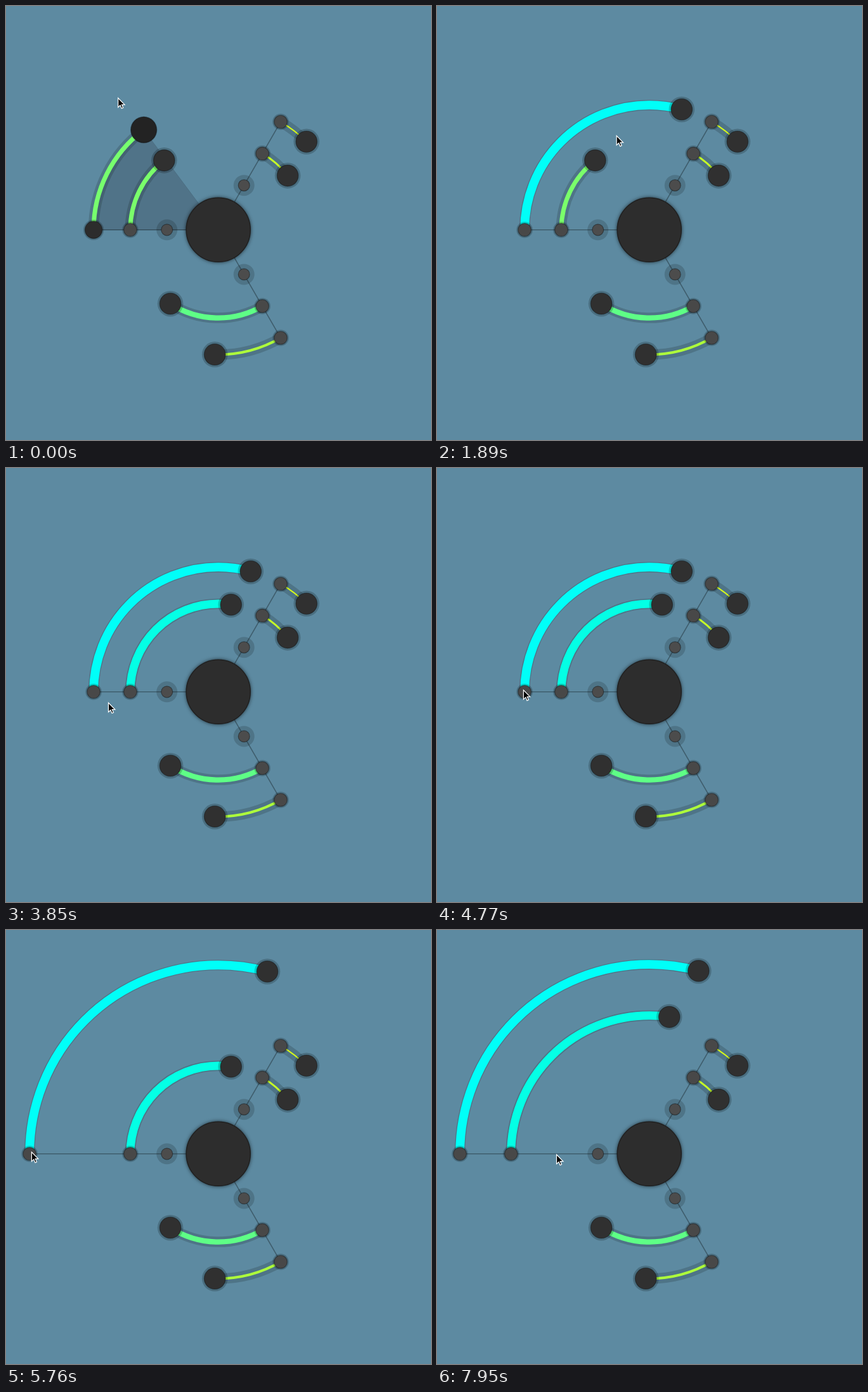
These frames come from a looping animation (670x684 px, 8000 ms). An HTML page with a canvas:

```html
<!DOCTYPE html>
<html lang="en">
<head>
<meta charset="utf-8">
<title>Radial sliders</title>
<style>
html, body { margin: 0; width: 100%; height: 100%; overflow: hidden; background: #5d8aa1; }
canvas { display: block; width: 670px; height: 684px; }
</style>
</head>
<body>
<canvas id="stage"></canvas>
<script>
const W = 670, H = 684, LOOP = 8000;
const CX = 334.7, CY = 352.8, RAD = Math.PI / 180;
const STUB = 81, INNER = 138.8, OUTER = 196.6;
const canvas = document.getElementById('stage');
const ratio = window.devicePixelRatio || 1;
canvas.width = W * ratio;
canvas.height = H * ratio;
const ctx = canvas.getContext('2d');

const sine = u => (1 - Math.cos(Math.PI * u)) / 2;
const cubic = u => u < 0.5 ? 4 * u ** 3 : 1 - 4 * (1 - u) ** 3;
const mix = (a, b, f) => a + (b - a) * f;
const progress = (t, start, end) => Math.min(1, Math.max(0, (t - start) / (end - start)));
const tween = (t, start, end, a, b, ease = sine) => mix(a, b, ease(progress(t, start, end)));

// Turning points of the pointer: time, x, y
const path = [
  [0, 176, 145], [450, 265, 126], [1050, 447, 142], [1350, 486, 150],
  [1830, 289, 199], [2240, 246, 236], [2450, 246, 236], [2890, 301, 241],
  [3420, 351, 241], [3770, 115, 366], [3850, 161, 370], [4480, 140, 350],
  [4770, 136, 350], [5220, 75, 351], [5520, 37, 350], [5750, 37, 350],
  [6370, 200, 355], [6880, 187, 351], [7030, 161, 348], [7630, 117, 351],
  [7720, 119, 352], [7950, 188, 354]
];

function pointerAt(t) {
  const next = path.findIndex(p => p[0] > t);
  if (next < 0) return path[path.length - 1].slice(1);
  const [t0, x0, y0] = path[next - 1], [t1, x1, y1] = path[next];
  const u = progress(t, t0, t1);
  return [mix(x0, x1, u), mix(y0, y1, u)];
}

const grey = v => `rgb(${v},${v},${v})`;
const black = a => `rgba(0,0,0,${a})`;
const polar = (deg, r) => [CX + r * Math.cos(deg * RAD), CY + r * Math.sin(deg * RAD)];

function disc(x, y, r, fill) {
  ctx.beginPath();
  ctx.arc(x, y, r, 0, 2 * Math.PI);
  ctx.fillStyle = fill;
  ctx.fill();
}

function knob(x, y, r, shade, halo) {
  disc(x, y, r + halo, black(0.2));
  disc(x, y, r, grey(shade));
  ctx.strokeStyle = black(0.35);
  ctx.lineWidth = 1.2;
  ctx.stroke();
}

function arc(from, span, r, width, color) {
  ctx.beginPath();
  ctx.arc(CX, CY, r, from * RAD, (from + span) * RAD);
  ctx.lineWidth = width;
  ctx.strokeStyle = color;
  ctx.stroke();
}

// Wider spans shift from yellow to cyan
function tint(span) {
  const red = Math.max(0, 255 * (1 - span / 100));
  const blue = 248 * (span / 105) ** 1.2;
  return `rgb(${Math.round(red)},255,${Math.round(blue)})`;
}

function sector(from, { span, r, focus = 0 }) {
  if (!focus) return;
  ctx.beginPath();
  ctx.moveTo(CX, CY);
  ctx.arc(CX, CY, r, from * RAD, (from + span) * RAD);
  ctx.closePath();
  ctx.fillStyle = `rgba(20,8,20,${0.34 * span / 105 * focus})`;
  ctx.fill();
  ctx.strokeStyle = black(0.1 * focus);
  ctx.lineWidth = 1;
  ctx.stroke();
}

function slider(from, { span, r, focus = 0 }) {
  arc(from, span, r, 16.5, black(0.16));
  arc(from, span, r, span / 7.6, tint(span));
  knob(...polar(from, r), mix(10.3, 13.6, focus), mix(72, 44, focus), 2.5);
  knob(...polar(from + span, r), mix(16.8, 20.3, focus), mix(48, 35, focus), mix(3.5, 1, focus));
}

function arm(from, sliders) {
  sliders.forEach(s => sector(from, s));
  ctx.beginPath();
  ctx.moveTo(CX, CY);
  ctx.lineTo(...polar(from, Math.max(...sliders.map(s => s.r))));
  ctx.strokeStyle = black(0.33);
  ctx.lineWidth = 1.6;
  ctx.stroke();
  const [x, y] = polar(from, STUB);
  disc(x, y, 16.5, black(0.16));
  knob(x, y, 9, 76, 0);
  sliders.forEach(s => slider(from, s));
}

function hub() {
  ctx.save();
  ctx.shadowColor = black(0.8);
  ctx.shadowBlur = 6 * ratio;
  disc(CX, CY, 50.5, '#2d2d2d');
  ctx.restore();
  ctx.strokeStyle = '#202020';
  ctx.lineWidth = 1.5;
  ctx.stroke();
}

const arrow = new Path2D('M0 0V14.6L3.4 11.5L5.6 16.6L8 15.5L5.9 10.6H10.4Z');

function drawPointer([x, y]) {
  ctx.save();
  ctx.translate(x + 0.5, y);
  ctx.fillStyle = '#000';
  ctx.strokeStyle = '#fff';
  ctx.lineWidth = 1.2;
  ctx.fill(arrow);
  ctx.stroke(arrow);
  ctx.restore();
}

function draw(t) {
  ctx.setTransform(ratio, 0, 0, ratio, 0, 0);
  ctx.fillStyle = '#5d8aa1';
  ctx.fillRect(0, 0, W, H);
  arm(180, [
    {
      span: tween(t, 0, 1250, 53.3, 105.05, cubic),
      r: tween(t, 4770, 5830, OUTER, 298.6),
      focus: tween(t, 1260, 1460, 1, 0)
    },
    {
      span: tween(t, 2450, 3500, 52.05, 98.3, cubic),
      r: tween(t, 6830, 7870, INNER, 218),
      focus: tween(t, 2420, 2620, 0, 1) - tween(t, 3420, 3620, 0, 1)
    }
  ]);
  arm(-60, [{ span: 15, r: OUTER }, { span: 22, r: INNER }]);
  arm(60, [{ span: 31.6, r: OUTER }, { span: 63, r: INNER }]);
  hub();
  drawPointer(pointerAt(t));
}

const begin = performance.now();
function tick() {
  draw((performance.now() - begin) % LOOP);
  requestAnimationFrame(tick);
}
tick();
</script>
</body>
</html>
```
